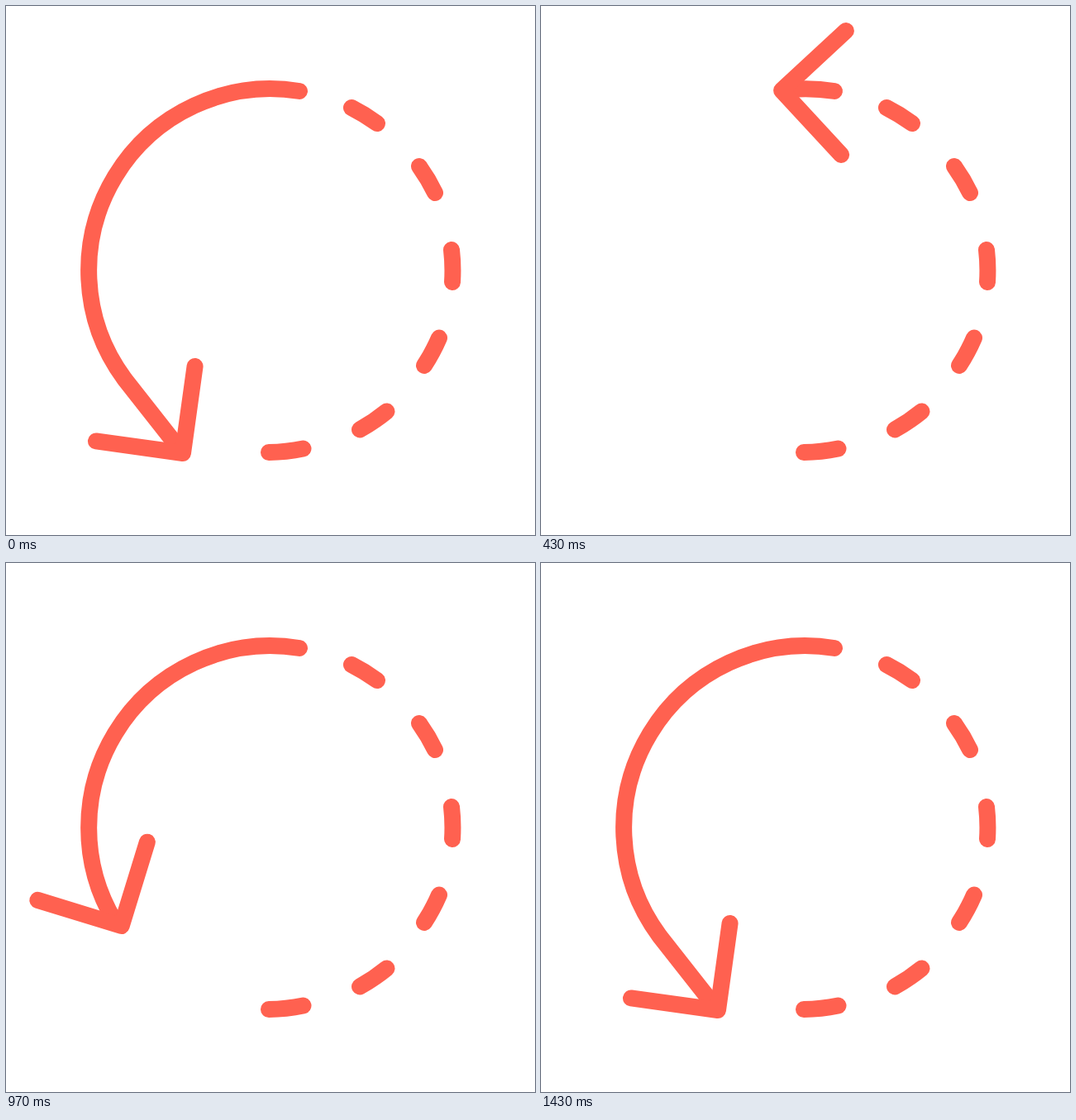
An HTML page for the animation above (2000 ms loop, 640 by 640 pixels).

```html
<!DOCTYPE html>
<html lang="en">
<head>
<meta charset="utf-8">
<title>Rewind arrow</title>
<style>
  html, body { margin: 0; width: 100%; height: 100%; overflow: hidden; background: #fff; }
  svg { display: block; width: 100vw; height: 100vh; }
  path { fill: none; stroke: #ff6150; stroke-width: 20; stroke-linecap: round; stroke-linejoin: round; }
  #track { stroke: none; }
</style>
</head>
<body>
<svg viewBox="0 0 640 640">
  <path d="M418 123A220 220 0 0 1 449 142M500 194A220 220 0 0 1 519 226M539 295A220 220 0 0 1 540 334M524 401.500A220 220 0 0 1 506 435M460.500 490.500A220 220 0 0 1 428 512.500M359.500 535.500A220 220 0 0 1 318 540"/>
  <path id="track" d="M355 103A220 220 0 0 0 100 320C100 363 113 400 139 438C160 470 184 515 214 541"/>
  <path id="tail" d="M355 103A220 220 0 0 0 143.600 451.500L214 541"/>
  <path id="head" d="M-75 -75L0 0L-75 75"/>
</svg>
<script>
  const LOOP = 2000, FPS = 30;
  const track = document.getElementById("track");
  const tail = document.getElementById("tail");
  const head = document.getElementById("head");
  const full = track.getTotalLength();

  // Poses: distance along the track and heading in degrees
  const END = { s: full, a: 52.9 };
  const TOP = { s: 35, a: 188.8 };
  const BEND = { s: 511.5, a: 61.7 };

  const mix = (a, b, u) => a + (b - a) * u;
  const smooth = u => u * u * (3 - 2 * u);
  const easeOut = (u, n) => 1 - Math.pow(1 - u, n);
  const blend = (p, q, us, ua) => ({ s: mix(p.s, q.s, us), a: mix(p.a, q.a, ua) });

  function pose(k) {
    if (k < 15) {
      const u = smooth(k / 15);
      return blend(END, TOP, u, u);
    }
    if (k < 32) {
      const u = (k - 15) / 17;
      return blend(TOP, BEND, easeOut(u, 2.85), easeOut(u, 3.34));
    }
    const u = easeOut(Math.min(1, (k - 32) / 11), 8.6);
    return blend(BEND, END, u, u);
  }

  function draw(ms) {
    // Motion advances in steps of 1/30 s
    const k = Math.floor((ms % LOOP + 3.4) * FPS / 1000);
    const { s, a } = pose(k);
    const p = track.getPointAtLength(s);
    head.setAttribute("transform", `translate(${p.x} ${p.y}) rotate(${a})`);
    // The tail stops just inside the arrow tip
    tail.setAttribute("stroke-dasharray", `${s - 8} 2000`);
  }

  const start = performance.now();
  function tick() {
    draw(performance.now() - start);
    requestAnimationFrame(tick);
  }
  draw(0);
  requestAnimationFrame(tick);
</script>
</body>
</html>
```
